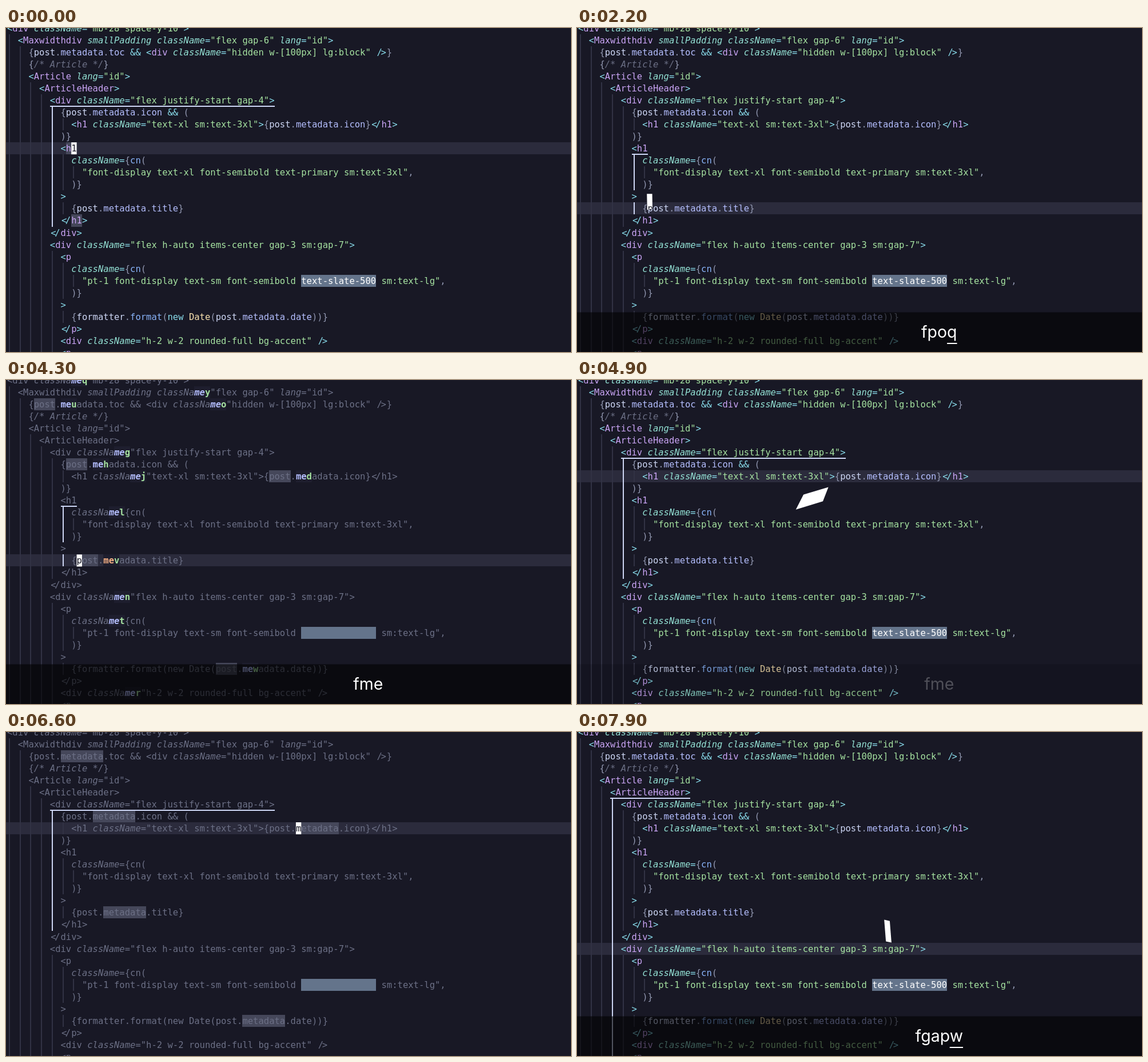
These frames come from a looping animation (988 px wide and 567 px high, 8 s). An HTML page with a canvas:

```html
<!DOCTYPE html>
<html lang="en">
<head>
<meta charset="utf-8">
<title>Jump search in a code editor</title>
<style>
  html, body { margin: 0; width: 100%; height: 100%; overflow: hidden; background: #181825; }
  canvas { display: block; }
</style>
</head>
<body>
<canvas id="stage" width="988" height="567"></canvas>
<script>
const ctx = document.getElementById('stage').getContext('2d');
const W = 988, H = 567, LOOP = 8000, STEP = 100;
const CELL = 9.35, LEFT = 2, ROW = 21.06, TOP = -10.5, BASE = 16;
const MONO = '15.53px "DejaVu Sans Mono", "Noto Sans Mono", monospace';

const C = {
  bg: '#181825', line: '#2b2b3c', guide: '#313244', word: '#45475a', slate: '#64748b',
  text: '#cdd6f4', lavender: '#b4befe', mauve: '#cba6f7', teal: '#94e2d5', sky: '#89dceb',
  green: '#a6e3a1', blue: '#89b4fa', yellow: '#f9e2af', peach: '#fab387',
  punct: '#9399b2', dim: '#6c7086', match: '#1e1e2e', cursor: '#ffffff'
};

const LINES = `<div className="mb-28 space-y-10">
  <Maxwidthdiv smallPadding className="flex gap-6" lang="id">
    {post.metadata.toc && <div className="hidden w-[100px] lg:block" />}
    {/* Article */}
    <Article lang="id">
      <ArticleHeader>
        <div className="flex justify-start gap-4">
          {post.metadata.icon && (
            <h1 className="text-xl sm:text-3xl">{post.metadata.icon}</h1>
          )}
          <h1
            className={cn(
              "font-display text-xl font-semibold text-primary sm:text-3xl",
            )}
          >
            {post.metadata.title}
          </h1>
        </div>
        <div className="flex h-auto items-center gap-3 sm:gap-7">
          <p
            className={cn(
              "pt-1 font-display text-sm font-semibold text-slate-500 sm:text-lg",
            )}
          >
            {formatter.format(new Date(post.metadata.date))}
          </p>
          <div className="h-2 w-2 rounded-full bg-accent" />
          <p`.split('\n');

// [pattern, colour, italic]
const SYNTAX = [
  [/\/\*.*?\*\//g, C.dim, true],
  [/"[^"]*"/g, C.green],
  [/<\/?|\/?>|&&|=|\bnew\b/g, C.sky],
  [/(?<=<\/?)\w+/g, C.mauve],
  [/\b(className|lang|smallPadding)\b/g, C.teal, true],
  [/\bcn\b|\bformat(?=\()/g, C.blue],
  [/\bDate\b/g, C.yellow],
  [/\b(metadata|toc|icon|title|date)\b/g, C.lavender],
  [/\b(post|formatter)\b/g, C.text]
];

function colourLine(src) {
  const cells = [...src].map(ch => ({ ch, color: C.punct, italic: false, nudge: 0, set: false }));
  for (const [re, color, italic] of SYNTAX) {
    for (const m of src.matchAll(re)) {
      if (cells[m.index].set) continue;
      for (let i = m.index; i < m.index + m[0].length; i++) {
        Object.assign(cells[i], { color, italic: !!italic, set: true });
      }
    }
  }
  // tight tag delimiters
  for (const m of src.matchAll(/<\/|\/>/g)) {
    cells[m.index].nudge = 1.4;
    cells[m.index + 1].nudge = -1;
  }
  return cells;
}
const CODE = LINES.map(colourLine);
const indent = r => LINES[r].search(/\S/);

const colX = c => LEFT + c * CELL;
const rowY = r => TOP + r * ROW;
const SLATE = { row: 21, col: LINES[21].indexOf('text-slate-500'), len: 14 };

// Timelines: the last entry whose time has passed is the current one.
const at = (list, t) => list.filter(e => e[0] <= t).pop();

const DIM = [[0, false], [800, true], [2200, false], [3500, true], [4900, false], [6600, true], [7900, false]];
const SEARCH = [
  [0, ''], [1500, 'p', 'bczywkjdfgquivnm'], [1700, 'po', 'yjdqv'],
  [2200, ''], [4000, 'm', 'qwrtyuoghjkdlzxcvnsf'], [4100, 'me', 'qyuoghjdlvntwrk'],
  [4900, ''], [7000, 'g', 'qtyrkjwuo'], [7100, 'ga', 'tkjw'], [7300, 'gap', 'tkjw'], [7900, '']
];
const WORD = [[0, /(?<=<\/?)h1/g, 10, 16], [2200, null], [2400, /\bpost\b/g, 0, 27],
  [4900, null], [5100, /\bmetadata\b/g, 0, 27], [7900, null]];
const KEYS = [
  [0, ''], [800, 'f'], [1500, 'fp'], [1700, 'fpo'], [2200, 'fpoq'], [3500, 'f'], [4000, 'fm'],
  [4100, 'fme'], [5000, 'd'], [6600, 'f'], [7000, 'fg'], [7100, 'fga'], [7300, 'fgap'], [7900, 'fgapw']
];
const FADE = [
  [0, 0], [800, 0], [1000, 1], [2700, 1], [2800, 0.85], [2900, 0.85], [3200, 0], [3500, 0],
  [3700, 1], [4800, 1], [4900, 0.25], [5000, 0.4], [5200, 1], [5500, 1], [5800, 0], [6600, 0],
  [6800, 1], [8000, 1]
];

// [time, row, col, progress of each corner at take-off: TL, TR, BR, BL]
const JUMPS = [
  [0, 10, 12, [1, 1, 1, 1]],
  [2200, 15, 13, [0.857, 0.857, 0.9, 0.925]],
  [4900, 8, 54, [0.711, 0.8, 0.775, 0.676]],
  [7900, 18, 58, [0.81, 0.82, 0.9, 0.89]]
];
const DIV_SCOPE = { head: 6, col: 8, last: 16 };
const SCOPE = [[0, DIV_SCOPE], [2200, { head: 10, col: 10, last: 15 }], [4900, DIV_SCOPE],
  [7900, { head: 5, col: 6, last: 27 }]];

function fade(t) {
  const i = FADE.findIndex(e => e[0] > t);
  const [t0, a0] = FADE[i - 1], [t1, a1] = FADE[i];
  return a0 + (a1 - a0) * (t - t0) / (t1 - t0);
}

// Fills whole pixels so that edges stay sharp.
function fillBox(x, y, w, h, color) {
  const l = Math.round(x), t = Math.round(y);
  ctx.fillStyle = color;
  ctx.fillRect(l, t, Math.round(x + w) - l, Math.round(y + h) - t);
}

const fillCells = (row, col, n, color) => fillBox(colX(col), rowY(row), n * CELL, ROW, color);

function glyph(ch, row, col, color, style = 'normal', nudge = 0) {
  if (ch === ' ') return;
  ctx.font = style + ' ' + MONO;
  ctx.fillStyle = color;
  ctx.fillText(ch, colX(col) + nudge, rowY(row) + BASE);
}

function drawGuides(scope) {
  LINES.forEach((src, r) => {
    for (let c = 0; c < indent(r); c += 2) {
      const lit = c === scope.col && r > scope.head && r <= scope.last;
      fillBox(colX(c) + 3, rowY(r), 2, ROW, lit ? C.text : C.guide);
    }
  });
  const len = LINES[scope.head].length - scope.col;
  fillBox(colX(scope.col), rowY(scope.head + 1) - 1, len * CELL, 2, C.text);
}

function drawWords([, re, first, last]) {
  if (!re) return;
  for (let r = first; r <= last; r++) {
    for (const m of LINES[r].matchAll(re)) fillCells(r, m.index, m[0].length, C.word);
  }
}

function findMatches(query, labels, row, col) {
  const found = [];
  LINES.forEach((src, r) => {
    for (const m of src.matchAll(new RegExp(query, 'gi'))) {
      found.push({ row: r, col: m.index, label: labels[found.length] });
    }
  });
  const next = found.find(m => m.row > row || (m.row === row && m.col > col));
  if (next) next.current = true;
  return found;
}

function drawCode(dim, matches, size) {
  const taken = new Set();
  for (const m of matches) {
    const n = size + (m.label ? 1 : 0);
    fillCells(m.row, m.col, n, C.match);
    for (let i = 0; i < n; i++) taken.add(m.row * 100 + m.col + i);
  }
  CODE.forEach((cells, r) => cells.forEach((cell, c) => {
    if (taken.has(r * 100 + c)) return;
    const slate = r === SLATE.row && c >= SLATE.col && c < SLATE.col + SLATE.len;
    if (slate && dim) return;
    const color = slate ? C.cursor : dim ? C.dim : cell.color;
    glyph(cell.ch, r, c, color, cell.italic ? 'italic' : 'normal', cell.nudge);
  }));
  for (const m of matches) {
    for (let i = 0; i < size; i++) {
      const cell = CODE[m.row][m.col + i];
      glyph(cell.ch, m.row, m.col + i, m.current ? C.peach : C.lavender,
        cell.italic ? 'italic bold' : 'bold');
    }
    if (m.label) glyph(m.label, m.row, m.col + size, C.green, 'bold');
  }
}

const corners = (row, col) => {
  const x = colX(col), y = rowY(row);
  return [[x, y], [x + CELL, y], [x + CELL, y + ROW], [x, y + ROW]];
};

function drawCursor(t) {
  const jump = at(JUMPS, t);
  const [start, row, col, progress] = jump;
  const from = JUMPS[Math.max(0, JUMPS.indexOf(jump) - 1)];
  const a = corners(from[1], from[2]), b = corners(row, col);
  const k = Math.floor((t - start) / STEP);
  const decay = k > 2 ? 0 : 0.25 ** k;
  ctx.save();
  ctx.beginPath();
  b.forEach(([x, y], i) => {
    const rest = (1 - progress[i]) * decay;
    ctx.lineTo(x + (a[i][0] - x) * rest, y + (a[i][1] - y) * rest);
  });
  ctx.closePath();
  ctx.fillStyle = C.cursor;
  ctx.fill();
  ctx.clip();
  glyph(LINES[row][col], row, col, C.bg);
  ctx.restore();
}

function drawKeys(t) {
  const alpha = fade(t);
  if (!alpha) return;
  const [since, keys] = at(KEYS, t);
  ctx.save();
  ctx.globalAlpha = alpha;
  ctx.fillStyle = 'rgba(0, 0, 0, 0.6)';
  ctx.fillRect(0, 497.5, W, H - 497.5);
  ctx.font = '28.5px Inter, sans-serif';
  ctx.fillStyle = '#fff';
  const width = ctx.measureText(keys).width, x = 633.3 - width / 2;
  ctx.fillText(keys, x, 541.5);
  if (t - since < 200) {
    const last = ctx.measureText(keys.slice(-1)).width;
    ctx.fillRect(x + width - last, 551, last, 2);
  }
  ctx.restore();
}

function draw(t) {
  const [, row, col] = at(JUMPS, t);
  const [, query, labels] = at(SEARCH, t);
  fillBox(0, 0, W, H, C.bg);
  fillBox(0, rowY(row), W, ROW, C.line);
  drawWords(at(WORD, t));
  fillCells(SLATE.row, SLATE.col, SLATE.len, C.slate);
  drawGuides(at(SCOPE, t)[1]);
  drawCode(at(DIM, t)[1], query ? findMatches(query, labels, row, col) : [], query.length);
  drawCursor(t);
  drawKeys(t);
}

let shown = -1;
const begin = performance.now();
function tick() {
  const t = Math.floor(((performance.now() - begin) % LOOP) / STEP) * STEP;
  if (t !== shown) draw(shown = t);
  requestAnimationFrame(tick);
}
tick();
</script>
</body>
</html>
```
